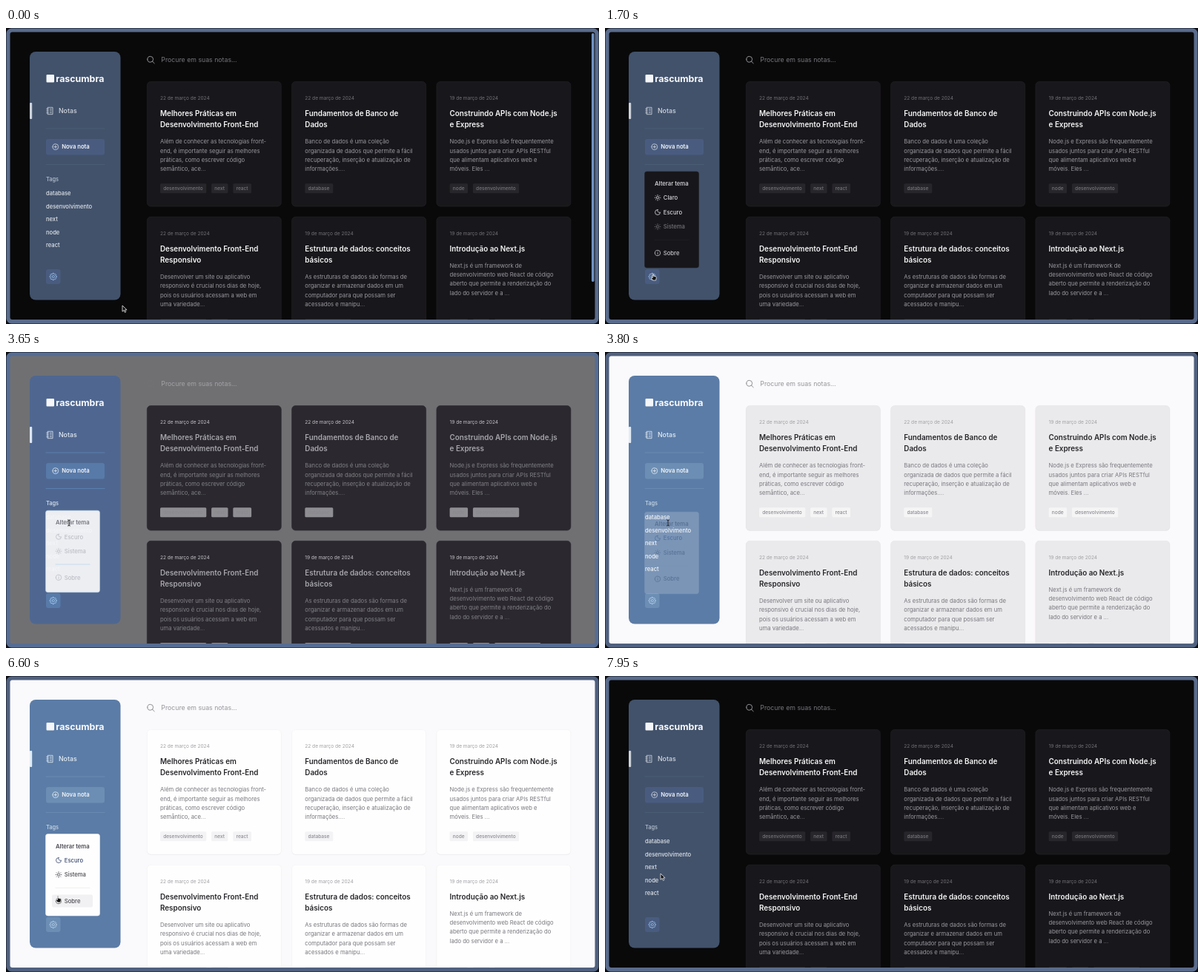
Animation, 800 px wide and 400 px high, one loop 8000 ms. Source, as an HTML page:

```html
<!DOCTYPE html>
<html lang="pt">
<meta charset="utf-8">
<title>Notas</title>
<style>
html, body { margin: 0; width: 100%; height: 100%; overflow: hidden; background: #0c0e14; }
svg { display: block; width: 800px; height: 400px; font-family: Inter, sans-serif; }
text { white-space: pre; }
.line { fill: none; stroke-width: .8; stroke-linecap: round; stroke-linejoin: round; }
</style>
<body>
<script>
// Colours: dark, brightening, light, darkening, optional almost light
const palette = {
  frame: '5a6c8c 566d94 50617f 556a8c',
  bg: '09090a 6f6f72 faf9fb 525155',
  side: '42526b 4f6790 5b7ca6 4f6488',
  mark: 'ccd2dc dbe5f2 e0ecf6 d5dce8',
  rule: '4d5d78 5c86b8 6d8eb4 4f6488',
  button: '495c80 587aa8 6c8eb4 576d96',
  gear: '9cc4f2 a8d0f8 b9d3ec dbe6f4',
  label: 'b7c1d0 dde6f2 cad8e7 5a6c8c',
  link: 'e0e4ea e8eef5 f3f6fa 6a7c98',
  nav: 'd3d8e0 e4ebf4 e6eef6 dfe6f0',
  card: '18171b 2a282e fefefe d0ced2 eaeaec',
  edge: '252429 2a282e f2f2f4 d0ced2 e4e4e6',
  shade: '09090a 6a6a6d e9e9ec 525155',
  date: '737278 c4c3c8 a0a0a6 48474c',
  title: 'f6f6f7 a8a7ad 27272b b0aeb4',
  body: '9a99a0 828187 78787f 929096',
  chip: '27262b 8e8d91 f3f3f5 5a595e f5f5f6',
  chipText: '77767c 8a898e 8b8b92 98979d',
  search: '77767c a3a2a6 96969c 6a696e',
  lens: 'b4b3b8 737376 75757b bcbbc0',
  menu: '17161a f6f6f8 fefefe 222b37',
  head: 'c9c8cd 77777e 4a4a52 b8bcc4',
  claro: 'd8d7dc c4c4ca 4a4a52 f2f3f5',
  escuro: 'd8d7dc c4c4ca 3c4a70 707680',
  sistema: '737278 c4c4ca 4a4a52 343940',
  sobre: 'c9c8cd c4c4ca 4a4a52 8a8f98',
  hover: '252429 eeeef1 f1f1f3 484c52',
  split: '222126 c4dcf2 ececef 2a3340'
};
const themeKeys = [[0, 0], [3580, 0], [3650, 1], [3800, 4], [3950, 2], [7480, 2], [7550, 3], [7750, 0], [8000, 0]];
const cursorKeys = [
  [0, 157, 375], [150, 157, 375], [950, 65, 332], [1700, 65, 332], [2450, 80, 249], [3200, 85, 230],
  [4450, 85, 230], [4950, 180, 384], [5500, 64, 332], [5900, 64, 332], [6350, 70, 297], [6850, 70, 297],
  [7250, 75, 267], [8000, 75, 267]
];
const cards = [
  ['22', 'Melhores Práticas em|Desenvolvimento Front-End',
    'Além de conhecer as tecnologias front-|end, é importante seguir as melhores|práticas, como escrever código|semântico, ace...', 'desenvolvimento next react'],
  ['22', 'Fundamentos de Banco de|Dados',
    'Banco de dados é uma coleção|organizada de dados que permite a fácil|recuperação, inserção e atualização de|informações....', 'database'],
  ['19', 'Construindo APIs com Node.js|e Express',
    'Node.js e Express são frequentemente|usados juntos para criar APIs RESTful|que alimentam aplicativos web e|móveis. Eles ...', 'node desenvolvimento'],
  ['22', 'Desenvolvimento Front-End|Responsivo',
    'Desenvolver um site ou aplicativo|responsivo é crucial nos dias de hoje,|pois os usuários acessam a web em|uma variedade...', 'desenvolvimento next'],
  ['19', 'Estrutura de dados: conceitos|básicos',
    'As estruturas de dados são formas de|organizar e armazenar dados em um|computador para que possam ser|acessados e manipu...', 'desenvolvimento'],
  ['19', 'Introdução ao Next.js',
    'Next.js é um framework de|desenvolvimento web React de código|aberto que permite a renderização do|lado do servidor e a ...', 'node next desenvolvimento']
];
const chipWidth = { desenvolvimento: 62.3, next: 22.4, react: 24.8, database: 38, node: 24.5 };

const paint = c => c[0] === '#' ? c : `var(--${c})`;
const rect = (x, y, w, h, r, c, more = '') =>
  `<rect x="${x}" y="${y}" width="${w}" height="${h}" rx="${r}" style="fill:${paint(c)}" ${more}/>`;
const text = (x, y, s, size, weight, c) =>
  `<text x="${x}" y="${y}" font-size="${size}" font-weight="${weight}" style="fill:${paint(c)}">${s}</text>`;
const line = (d, c) => `<path class="line" d="${d}" style="stroke:${paint(c)}"/>`;
const ring = (x, y, r) => `M${x - r} ${y}a${r} ${r} 0 1 0 ${2 * r} 0a${r} ${r} 0 1 0 ${-2 * r} 0`;
const polar = (x, y, r, a) => `${(x + r * Math.cos(a)).toFixed(2)} ${(y + r * Math.sin(a)).toFixed(2)}`;
const eight = f => Array.from({ length: 8 }, (_, i) => f(i * Math.PI / 4)).join('');
const sun = (x, y) => ring(x, y, 1.6) + eight(a => `M${polar(x, y, 3, a)}L${polar(x, y, 3.9, a)}`);
const moon = (x, y) => `M${x} ${y - 3.5}a2.6 2.6 0 0 0 3.5 3.5a3.5 3.5 0 1 1 -3.5 -3.5z`;
const info = (x, y) => ring(x, y, 3.7) + `M${x} ${y - .2}v1.9M${x} ${y - 1.8}v.1`;
const gear = (x, y) => ring(x, y, 1.6) + 'M' + eight(a =>
  [[-.3, 3.5], [-.17, 4.7], [.17, 4.7], [.3, 3.5]].map(([d, r]) => polar(x, y, r, a + d) + 'L').join('')).slice(0, -1) + 'z';

function cardArt([day, title, body, tags], i) {
  const x = 190 + i % 3 * 195.3, y = i < 3 ? 72 : 254.7, left = x + 18;
  const heads = title.split('|');
  let out = rect(x + .3, y + 1.4, 181, 168.4, 5, 'shade') +
    rect(x + .3, y + .6, 181, 168.4, 5, 'card', 'stroke="var(--edge)" stroke-width=".6"') +
    text(left, y + 25.2, day + ' de março de 2024', 6.56, 400, 'date');
  heads.forEach((s, n) => out += text(left, y + 47 + n * 15.4, s, 9.85, 600, 'title'));
  const top = y + 69 + heads.length * 15.4 - 15.4;
  body.split('|').forEach((s, n) => out += text(left, top + n * 12.3, s, 7.66, 400, 'body'));
  let cx = left;
  for (const tag of tags.split(' ')) {
    out += rect(cx, y + 138.3, chipWidth[tag], 13, 1.5, 'chip') + text(cx + 4.2, y + 147, tag, 6.56, 500, 'chipText');
    cx += chipWidth[tag] + 6.8;
  }
  return out;
}

const rows = [['Claro', 229.3, 'claro', sun], ['Escuro', 249, 'escuro', moon], ['Sistema', 268.5, 'sistema', sun], ['Sobre', 304, 'sobre', info]];
const rowArt = ([name, y, c, icon]) =>
  `<g id="${c}">${line(icon(71, y), c)}${text(78.8, y + 2.8, name, 7.66, 500, c)}</g>`;

document.body.innerHTML = `<svg viewBox="0 0 800 400">
<clipPath id="clip"><rect x="5.5" y="5.5" width="789" height="388.5" rx="3"/></clipPath>
${rect(.5, .5, 799, 399, 7, 'frame')}
<g clip-path="url(#clip)">
  ${rect(5, 5, 790, 390, 0, 'bg')}
  ${line(ring(194.7, 42.3, 3.9) + 'M197.6 45.2l2.6 2.6', 'lens')}
  ${text(209.3, 46.2, 'Procure em suas notas...', 8.75, 400, 'search')}
  ${cards.map(cardArt).join('')}
  <g id="bar">${rect(790, 7, 3.5, 336, 1.7, '#7092c0')}</g>
</g>
${rect(32, 32, 122.5, 335.5, 8, 'side')}
${rect(54.5, 63, 10.5, 10.5, 1, '#f4f6f9')}
${text(67.3, 73.2, 'rascumbra', 12.4, 700, '#f8f9fb')}
${rect(32, 101, 3.2, 22, 1, 'mark')}
${line('M56.5 107.3h6.5v9.4h-6.5zM54.8 109.3h2.6M54.8 112h2.6M54.8 114.7h2.6M59.3 109.6h2M59.3 112h2M59.3 114.4h2', 'nav')}
${text(71, 115.2, 'Notas', 8.75, 500, 'nav')}
${line('M54 136h79M54 184.5h79', 'rule')}
${rect(54, 150, 79, 21.5, 3, 'button')}
${line(ring(66.8, 160.6, 3.9) + 'M65 160.6h3.6M66.8 158.8v3.6', 'nav')}
${text(75.2, 163.4, 'Nova nota', 7.66, 600, '#f3f5f8')}
${text(54, 206.6, 'Tags', 7.4, 500, 'label')}
${['database', 'desenvolvimento', 'next', 'node', 'react'].map((s, i) => text(54, 226.4 + i * 17.5, s, 7.6, 500, 'link')).join('')}
${rect(54, 326, 19.5, 20, 3, 'button')}
${line(gear(63.7, 336), 'gear')}
<g id="pop">
  <rect id="sheet" x="53.5" width="73" rx="3" style="fill:var(--menu);stroke:var(--split);stroke-width:.6"/>
  ${rect(62, 0, 55, 17, 2, 'hover', 'id="glow"')}
  <g id="heading">${text(67, 0, 'Alterar tema', 7.66, 600, 'head')}</g>
  ${rows.map(rowArt).join('')}
  ${line('M67 286.3h46', 'split')}
</g>
<g id="cursor">
  <path id="arrow" d="M0 0v8.2l2-1.8 1.4 3 1.4-.7-1.4-2.8h2.7z" fill="#111" stroke="#eee" stroke-width=".8"/>
  <path id="hand" d="M-.6.6Q0-.4.6.6V3.2L3.6 4Q4.6 4.4 4.3 5.6L3.6 9H-.4L-2.6 6Q-2.8 4.6-.6 5.4z" fill="#111" stroke="#eee" stroke-width=".8"/>
  <path id="beam" d="M-1.8-3.2Q0-3.2 0-2Q0-3.2 1.8-3.2M0-2V4M-1.8 5Q0 5 0 3.8Q0 5 1.8 5" fill="none" stroke="#222" stroke-width="1"/>
</g>
</svg>`;

const $ = id => document.getElementById(id);
const show = (id, on) => $(id).style.display = on ? '' : 'none';
const ramp = (t, a, b) => Math.min(1, Math.max(0, (t - a) / (b - a)));
const mix = (a, b, u) => a + (b - a) * u;
function span(keys, t) {
  const i = Math.max(1, keys.findIndex(k => k[0] > t));
  return [keys[i - 1], keys[i], ramp(t, keys[i - 1][0], keys[i][0])];
}
const colours = Object.entries(palette).map(([name, list]) => {
  const c = list.split(' ').map(h => [0, 2, 4].map(i => parseInt(h.slice(i, i + 2), 16)));
  c[4] ||= c[2];
  return [name, c];
});

function draw(t) {
  const [from, to, u] = span(themeKeys, t);
  for (const [name, c] of colours) {
    const rgb = c[from[1]].map((v, i) => Math.round(mix(v, c[to[1]][i], u)));
    document.body.style.setProperty('--' + name, `rgb(${rgb})`);
  }

  const [a, b, v] = span(cursorKeys, t), ease = v * v * (3 - 2 * v);
  const x = mix(a[1], b[1], ease), y = mix(a[2], b[2], ease);
  $('cursor').setAttribute('transform', `translate(${x} ${y})`);
  const beam = t >= 3580 && t < 4500;
  const hand = t >= 850 && t < 3580 || t >= 5400 && t < 7480;
  show('beam', beam);
  show('hand', hand);
  show('arrow', !beam && !hand);

  const open = ramp(t, 1050, 1200) - ramp(t, 3640, 3840) + ramp(t, 5700, 5850) - ramp(t, 7520, 7720);
  const light = t >= 3580 && t < 7480, top = light ? 213.5 : 194;
  $('pop').setAttribute('opacity', open);
  $('pop').setAttribute('transform', `translate(0 ${3 * Math.sqrt(Math.max(0, 1 - open))})`);
  $('sheet').setAttribute('y', top);
  $('sheet').setAttribute('height', 324 - top);
  $('heading').setAttribute('transform', `translate(0 ${top + 19.2})`);
  show('claro', !light);
  const row = rows.find((r, i) => Math.abs(r[1] - y - 2) < 9 && !(light && !i));
  show('glow', row && !beam);
  if (row) $('glow').setAttribute('y', row[1] - 8.5);
  show('bar', t < 1050 || t >= 3950 && t < 5700);
}

function tick() {
  draw(performance.now() % 8000);
  requestAnimationFrame(tick);
}
tick();
</script>
</body>
</html>
```
